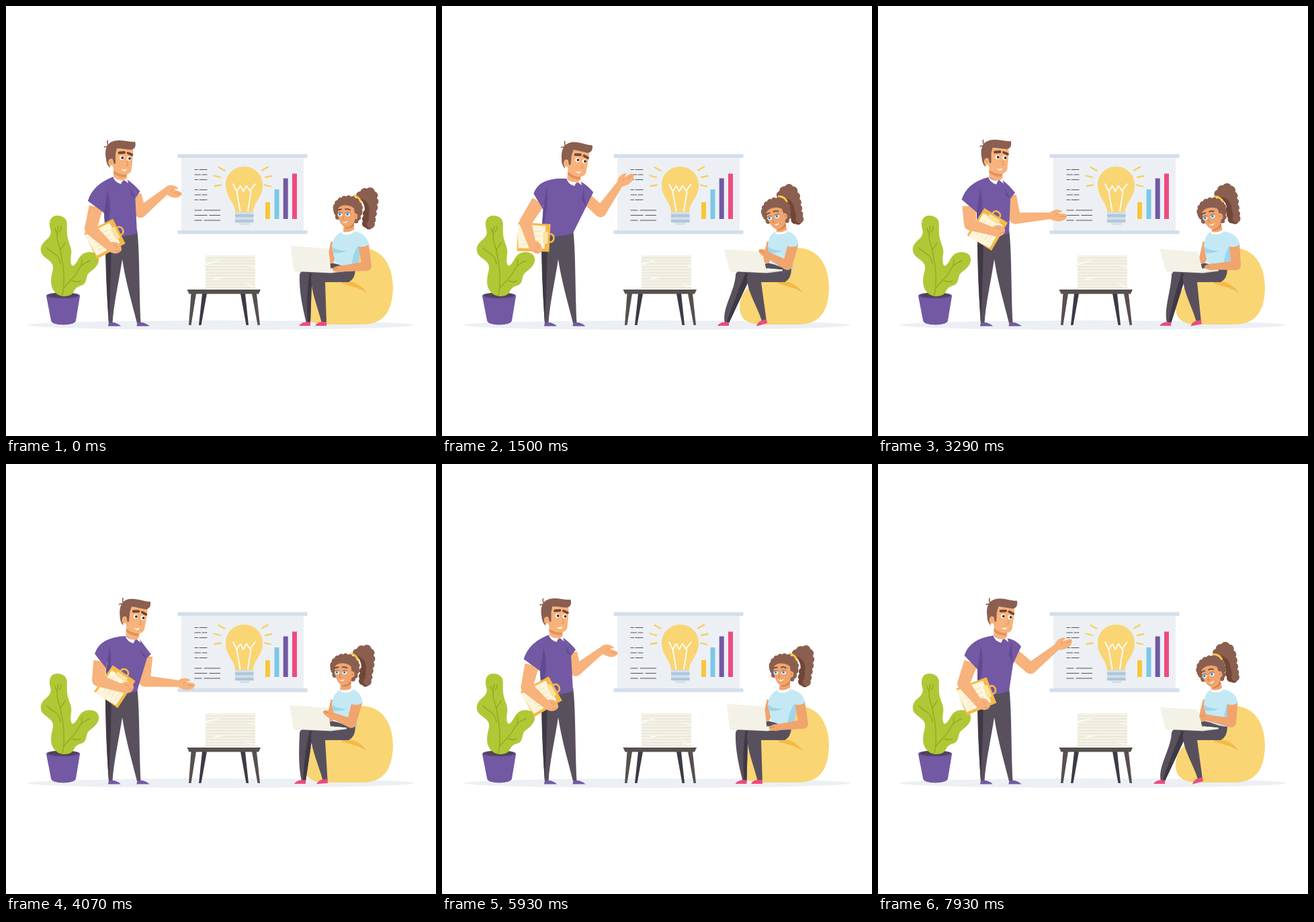
Write an HTML page with a canvas that moves like this. It is 640x640 px and loops after 8000 ms.

```html
<!DOCTYPE html>
<html lang="en">
<head>
<meta charset="utf-8">
<title>Presentation</title>
<style>
html, body { margin: 0; width: 100%; height: 100%; overflow: hidden; background: #fff; }
canvas { display: block; width: 100vw; height: 100vh; }
</style>
</head>
<body>
<canvas id="stage" width="640" height="640"></canvas>
<script>
const ctx = document.getElementById('stage').getContext('2d');
const LOOP = 8000, CYCLE = 6000;
const TIMES = [0, 570, 1500, 1930, 3290, 4070, 5210];
const C = {
  purple: '#7358a3', plum: '#614a92', skin: '#f8b27b', skinLine: '#e3935c', tan: '#f0a46e', tanLine: '#d5824d',
  hair: '#8a5f50', hairDark: '#704639', pants: '#58515d', pantsDark: '#3f3946', pink: '#ee4a80',
  yellow: '#f9d574', amber: '#f6b947', blue: '#c4e9f5', blueDark: '#9fd5ea', rail: '#d3dfea', board: '#ecf0f4',
  paper: '#f4f2e6', green: '#b0c736', vein: '#93ac1c', cream: '#fdf5db'
};

// Smooth cyclic curve through one value set per key time.
function track(...keys) {
  const n = keys.length;
  const at = i => keys[(i + n) % n];
  const when = i => TIMES[(i + n) % n] + CYCLE * Math.floor(i / n);
  const slope = (i, c) => (at(i + 1)[c] - at(i - 1)[c]) / (when(i + 1) - when(i - 1));
  return t => {
    let i = n - 1;
    while (TIMES[i] > t) i--;
    const span = when(i + 1) - when(i), u = (t - when(i)) / span, v = 1 - u;
    return at(i).map((a, c) =>
      a * (1 + 2 * u) * v * v + at(i + 1)[c] * u * u * (3 - 2 * u) +
      span * (slope(i, c) * u * v * v - slope(i + 1, c) * u * u * v));
  };
}

const man = {
  head: track([0, 0, 0], [14, 1, 3], [29, 3, 6], [13.5, .5, 3], [5.5, -1, 0], [20.5, 1, 5], [2, -1, 0]),
  elbowR: track([200, 307], [228, 302], [236, 306], [227, 304], [204, 316], [206, 323], [202, 312]),
  handR: track([240, 274, 5], [258, 256, -20], [266, 263, -45], [268, 271, -35], [259, 312, -10], [259, 327, -5], [250, 291, 3]),
  elbowL: track([126, 332], [124, 324], [124, 322], [127, 327], [137, 325], [137, 322], [130, 329]),
  handL: track([155, 359, 10], [141, 357, 35], [134, 355, 40], [150, 356, 15], [172, 336, -10], [173, 334, -10], [163, 350, -5]),
  board: track([147, 346, -27], [140.5, 345, -7], [136.5, 344, 3], [146.5, 345, -21], [163, 332, -58], [162, 331, -55], [155, 340, -45])
};
const woman = {
  head: track([0, 0, 0], [-5, 1, -6], [-11, 3, -14], [-12.5, 3, -14], [-11.5, 3, -13], [-4.5, 0, 0], [-5, 1, -7]),
  tail: track([0, 0, 0], [-8, -4, -6], [-18, -6, -18], [-18, -6, -17], [-16, -7, -16], [-5, -1, 0], [-8, -5, -8]),
  elbow: track([537, 387], [510, 384], [514, 386], [526, 385], [533, 386], [514, 386], [532, 387]),
  hand: track([500, 391], [483, 363], [484, 370], [492, 378], [500, 388], [485, 374], [497, 384]),
  sway: track([0, 0], [.5, 0], [1, 1], [1, 1], [.65, 1], [.27, .4], [.05, 0])
};

const fill = (d, color) => { ctx.fillStyle = color; ctx.fill(new Path2D(d)); };
const line = (d, color, width = 1) => {
  ctx.strokeStyle = color; ctx.lineWidth = width; ctx.lineCap = ctx.lineJoin = 'round';
  ctx.stroke(new Path2D(d));
};
const rect = (x, y, w, h, color) => { ctx.fillStyle = color; ctx.fillRect(x, y, w, h); };
const oval = (x, y, rx, ry, color) => {
  ctx.fillStyle = color; ctx.beginPath(); ctx.ellipse(x, y, rx, ry, 0, 0, 7); ctx.fill();
};
const dot = (x, y, r, color) => oval(x, y, r, r, color);

function placed(x, y, degrees, draw) {
  ctx.save(); ctx.translate(x, y); ctx.rotate(degrees * Math.PI / 180); draw(); ctx.restore();
}
// Moves and turns a part around its own pivot.
const posed = ([dx, dy, deg], px, py, draw) =>
  placed(px + dx, py + dy, deg, () => { ctx.translate(-px, -py); draw(); });

function taper([ax, ay], [bx, by], ra, rb, color) {
  const a = Math.atan2(by - ay, bx - ax), s = Math.sin(a), c = Math.cos(a);
  fill(`M${ax - s * ra},${ay + c * ra}L${bx - s * rb},${by + c * rb}L${bx + s * rb},${by - c * rb}L${ax + s * ra},${ay - c * ra}Z`, color);
  dot(bx, by, rb, color);
}
function arm(shoulder, elbow, wrist, r, color) {
  taper(shoulder, elbow, r[0], r[1], color);
  taper(elbow, wrist, r[1], r[2], color);
}

function drawBoard() {
  rect(261, 225, 182, 111, C.board);
  rect(255.5, 220.5, 193, 5.5, C.rail);
  rect(255.5, 334, 193, 5.5, C.rail);
  [243.5, 251, 258.5, 273.5, 281, 288.5].forEach((y, i) =>
    line(i % 3 === 1 ? `M281,${y}h8.5M292,${y}h7` : `M281,${y}h4.5M288,${y}h11`, C.pants, 1.2));
  [304, 311.5, 319].forEach((y, i) =>
    line(i === 1 ? `M281,${y}h18M303,${y}h15.5` : `M281,${y}h10M295,${y}h23.5`, C.pants, 1.2));

  line('M316.5,240l9,5M309.5,252.5l9.5,2.5M310.5,268l9-1.5M381,244.5l9-5M386,255l9.5-2M385,266.5l9,2', '#f8cf59', 2.3);
  fill('M341,307C341,292 327,286 327,266C327,251 339,239 354.500,239C370,239 382,251 382,266C382,286 368,292 368,307Z', C.yellow);
  line('M338,265L343.500,276L349,267.500L353,276L358,267.500L363,275L371,265M343.500,276L348.500,305M364.500,276L360,305', '#fff', 1.7);
  fill('M346,321h17.500l-2,5h-13.500Z', C.rail);
  rect(341, 306.5, 27.5, 16, C.rail);
  rect(341, 310, 27.5, 4.3, '#aec7da');
  rect(341, 318, 27.5, 4, '#aec7da');

  rect(386, 292, 7, 25, '#f7c63a');
  rect(399.5, 273, 7, 44, '#7cc7e6');
  rect(412.7, 256.5, 7, 60.5, C.purple);
  rect(426, 249.5, 7, 67.5, C.pink);
}

function drawPlant() {
  fill('M60,432H110L104,468Q103,474 85,474.500Q68,474 67,468Z', C.purple);
  oval(85, 431, 25, 4.7, C.plum);
  oval(85, 430.5, 22.5, 3.6, '#514454');
  fill('M76,312C66,312 63,322 66,332C69,342 62,346 56,352C50,358 50,368 58,374C66,380 73,384 69,396C66,408 65,422 78,430C84,433 94,433 99,428C104,420 103,419 112,416C121,413 118,406 122,399C126,394 139,388 138,376C137,367 126,364 116,368C108,372 108,380 101,386C97,389 95,380 97,370C99,360 92,352 91,340C90,330 92,322 89,318C86,313 80,312 76,312Z', C.green);
  line('M78,328C72,345 80,355 82,370C86,390 88,408 84,431M61,360C69,370 78,366 81,384M88,352C85,360 82,358 81,364M86,420C96,408 101,405 106,396C112,384 118,382 125,379M99,409C105,411 107,411 111,409M112,386C113,382 112,380 113,377M77,338Q73,335 73,331M79,336Q83,332 82,328', C.vein, 1.4);
}

function drawTable() {
  fill('M292,428h7l-8.500,47h-3.500ZM349,428h7l5,47h-3.500Z', C.pantsDark);
  fill('M275.500,428h7.500l-7.500,47h-3.500ZM366,428h7l5,47h-3.500Z', '#57504f');
  fill('M269.500,422H379L376,428.500H272.500Z', '#57504f');
  rect(297, 371, 74, 50, C.paper);
  for (let y = 375; y < 420; y += 4.4) line(`M297.500,${y}H370.500`, '#e2dfcf', .9);
  fill('M291,387Q302,379 321,378L300,385ZM370,387L376,391L356,385ZM306,408Q313,402 328,404ZM356,414L373,416L366,419Z', '#faf9f2');
}

function drawManHead() {
  fill('M160,236V255Q170,265 180,258V244Z', C.skin);
  fill('M160,245Q168,251 180,251L178,255Q166,255 160,249Z', C.skinLine);
  fill('M157,212L189,213C189,225 188,233 187,243C186,250 179,252 171,250C163,247 160,241 157,235Z', C.skin);
  fill('M149,228C146,213 150,204 160,201C172,198 182,203 192,202C194,208 192,214 185,214C178,213 171,212 165,212L163,220V234C160,238 160,230 158,227Q152,230 155,241Q149,235 149,228Z', C.hair);
  oval(156, 232.5, 3.6, 5.3, C.skin);
  line('M155,231q2,0 2,3', C.skinLine);
  line('M154,209Q150,206 151,200.500M154,210Q150,208 146.500,210', C.hair, 1.6);
  line('M168.500,218.500L176,218', C.hairDark, 3.8);
  line('M181.500,218.800L187.500,221.500', C.hairDark, 3.6);
  dot(172.3, 226, 3.2, '#fff');
  dot(183, 227, 3.2, '#fff');
  dot(173.2, 226, 1.9, '#453029');
  dot(184, 227, 1.9, '#453029');
  line('M180,231L181.500,237L178.500,237.500', C.skinLine, 1.1);
  fill('M170.500,242.500Q176,245 179.500,242Q178,249 170.500,242.500Z', '#fff');
}

function drawClipboard([x, y, angle]) {
  placed(x, y, angle, () => {
    line('M24,-6C32,-7 32,7 24,6', C.amber, 2.6);
    fill('M-24,-21L24,-20.500V20.500L-24,22Z', C.amber);
    fill('M-25,-18L17,-17.500V16.500L-22,17.500Z', C.cream);
    fill('M14,-9h7v18h-7Z', '#fae3a0');
    line('M-16,-9H10M-16,-2H10M-16,5H10M-16,11H5', '#efe0b3', 1);
  });
}

function drawMan(t) {
  const head = man.head(t), lean = head[0];
  const elbowR = man.elbowR(t), handR = man.handR(t), elbowL = man.elbowL(t), handL = man.handL(t);
  const nx = 170 + lean * .9, ny = 258 + lean * .1;
  const hemL = [134 + lean * .33, 299 - lean * .27], hemR = [196 + lean * .82, 281 + lean * .25];
  const lx = 12 - lean * .17, ly = 9 + lean * .1;
  const reach = Math.max(0, elbowR[0] - hemR[0]), rx = 3 + reach * .15, ry = 3 + reach * .5;
  const outerL = [hemL[0] - lx, hemL[1] - ly], innerL = [hemL[0] + lx, hemL[1] + ly];
  const outerR = [hemR[0] + rx, hemR[1] - ry], innerR = [hemR[0] - rx, hemR[1] + ry];

  fill('M150,337L195,333C199,360 198,420 200.500,472H195C187,440 178,410 173,377C168,410 160,445 158.500,472H153C150,430 149,390 148,345Z', C.pants);
  fill('M148,345H157C156,400 155,440 153,472C150,430 148,390 148,345Z', C.pantsDark);
  for (const x of [152, 194.5]) fill(`M${x + 1},471h5Q${x + 13},471 ${x + 19},476.500H${x}Z`, C.purple);

  arm([hemR[0] - 3, hemR[1]], elbowR, handR, [8.5, 8.5, 4.8], C.skin);
  placed(...handR, () => {
    fill('M-2,-5C4,-9 10,-8 15,-5Q17,-3 13,-2.500L9,-2L20,1Q24,4 21,6L18,9C10,12 3,9 -3,5Z', C.skin);
    line('M9,-2Q6,-1 5,1M11,3L20,4.500', C.skinLine, .9);
  });

  fill(`M${nx - 10},${ny - 4}Q${outerL[0] + 8},${outerL[1] - 25} ${outerL}L${innerL}L148,341Q172,346 195,338L${innerR}L${outerR}Q${outerR[0] - 8},${outerR[1] - 10} ${nx + 10},${ny}Z`, C.purple);
  fill(`M${innerR}L${outerR[0] - 15},${outerR[1] - 6}L${innerR[0] - 6},${innerR[1] - ry}Z`, C.plum);
  fill(`M${innerL}L148,338Q160,300 ${innerL[0] + 5},${innerL[1] - 34}Z`, C.plum);
  posed(head, 172, 228, drawManHead);
  fill(`M${nx - 11},${ny - 5}Q${nx - 4},${ny + 3} ${nx + 4},${ny + 1}L${nx + 1},${ny + 7}Q${nx - 9},${ny + 4} ${nx - 11},${ny - 5}ZM${nx + 6},${ny + 1}L${nx + 10},${ny - 2}L${nx + 12},${ny + 6}Z`, '#fff');

  drawClipboard(man.board(t));
  arm(hemL, elbowL, handL, [10.5, 9, 6], C.skin);
  placed(...handL, () => {
    fill('M-3,-6C4,-10 10,-10 15,-5Q19,0 16,4Q10,11 -2,6Z', C.skin);
    line('M5,-4Q9,-5 10,-1M9,4L15,3', C.skinLine, .9);
  });
  fill(`M${nx - 12},${ny - 2}Q${outerL[0] + 8},${outerL[1] - 25} ${outerL}L${innerL}L${innerL[0] + 4},${innerL[1] - 32}Z`, C.purple);
}

function drawTail() {
  const bumps = [[527, 282, 6], [534, 278, 7], [542, 277, 7], [547, 282, 6.5], [548, 291, 6.5], [547, 300, 6.5],
    [546, 309, 6], [545, 318, 5.5], [543, 325, 6]];
  [[536, 324, 6], [540, 327, 5.5], [536, 317, 6], [537, 309, 6]].forEach(b => dot(...b, C.hairDark));
  fill('M523,284Q538,276 546,290L546,328L535,328Q532,318 534,304Q534,291 523,284Z', C.hairDark);
  bumps.forEach(b => dot(...b, C.hair));
  fill('M524,281Q548,270 548,300L544,328Q538,318 541,305Q541,289 524,285Z', C.hair);
}

function drawWomanHead() {
  fill('M503,320L518,315L518,335Q510,342 502,336Z', C.tan);
  fill('M505,328Q513,327 518,320V327Q512,332 505,331Z', C.tanLine);
  oval(510, 301, 18.5, 16, C.hair);
  for (let a = 2.6; a < 6.9; a += .36) dot(509 + 18 * Math.cos(a), 301 + 15 * Math.sin(a), 4.3, C.hair);
  [[491, 300, 4.3], [492, 307, 4.2], [494, 314, 4], [526, 308, 4.5], [524, 315, 4.3], [521, 320, 3.6]].forEach(b => dot(...b, C.hair));
  fill('M494,302C498,295 510,295 518,301L520,316C518,326 511,330 505,329.500C497,327 493,314 494,302Z', C.tan);
  oval(520, 313, 3.3, 4.6, C.tan);
  line('M519,313q2-2 2,1', C.tanLine);
  line('M493.500,303.500L499,302.500M505,302.500Q508,301.500 512,303.500', C.hairDark, 1.8);
  for (const x of [497, 508.5]) {
    oval(x, 310, 3.5, 3.1, '#fff');
    dot(x - .3, 310, 2.1, '#55aede');
    dot(x - .3, 310, .9, '#34506b');
    line(`M${x - 3.5},308.500q3.500-3 7,0`, C.hairDark, .9);
  }
  line('M502,313L500.500,317.500L503,318', C.tanLine, 1);
  fill('M500,321Q504,323 509,320Q506,326 500,321Z', '#fff');
  line('M518,282Q526,284 528,292', '#f8c83c', 2.8);
}

function drawWoman(t) {
  const head = woman.head(t), elbow = woman.elbow(t), hand = woman.hand(t);
  const [swing, tilt] = woman.sway(t);
  const back = 450 - 26 * swing, front = 474 + 6 * swing, lift = 471 - 3 * swing;
  const nx = 508 + head[0] * .35, ny = 336, hx = 532 + .4 * (elbow[0] - 537);

  fill('M528,360C562,360 576,388 576,420C575,456 561,474 530,474H475C455,474 443,466 443,448C443,425 463,408 490,400Z', C.yellow);
  fill('M500,410C518,407 530,417 537,427C526,419 515,418 500,413Z', C.amber);

  fill(`M437,400Q438,394 446,395L470,395L455,412L${back + 3},472H${back - 3}C${back - 8},450 436,425 437,400Z`, C.pants);
  fill(`M452,397L462,402L455,412L${back + 3},472H${back - 1}Q${446 - 8 * swing},430 452,397Z`, C.pantsDark);
  fill(`M${back + 3},476H${back - 14}Q${back - 10},470 ${back - 2},470.500H${back + 3}Z`, C.pink);
  fill(`M484,382L520,391Q520,406 510,411L475,411L${front + 3},${lift + 1}H${front - 4}C${front - 10},448 454,425 454,405Q453,397 462,396Z`, C.pants);
  placed(front, lift, -16 * swing, () => fill('M3,5H-14Q-10,-1 -3,-1H3Z', C.pink));

  posed(woman.tail(t), 541, 301, drawTail);
  taper([490, 352], [483, 378], 6.5, 5.5, C.tan);
  fill(`M${nx - 6},${ny}C${nx - 16},${ny + 2} 486,346 485,358L490,382Q505,391 523,391L${hx - 6},359L${hx + 8},355Q${hx + 5},338 ${nx + 9},${ny - 1}Z`, C.blue);
  fill(`M${hx - 8},357L${hx - 4},362L523,391Q518,391 514,390Q515,370 ${hx - 8},357Z`, C.blueDark);
  fill('M486,358Q492,365 508,364Q497,369 487,367Z', C.blueDark);
  posed(head, 508, 305, drawWomanHead);
  fill(`M${nx - 7},${ny}Q${nx + 2},${ny + 2} ${nx + 9},${ny - 3}L${nx + 10},${ny}Q${nx + 2},${ny + 7} ${nx - 8},${ny + 3}Z`, '#fff');

  fill('M430,393L485,390.500L507,392.500V394.500L484,397.500L430,395Z', '#e3e2d5');
  fill('M484,390.500L507,392.500L484,395.500Z', '#f8f8f0');
  fill(`M${425 - 4 * tilt},${357 + 5 * tilt}Q${423 - 4 * tilt},${357 + 5 * tilt} ${424 - 4 * tilt},${359 + 5 * tilt}L428,394L484,397L${480 - 4 * tilt},${361 + 4.5 * tilt}Z`, C.paper);

  arm([hx, 354], elbow, hand, [7.7, 7, 4.5], C.tan);
  const a = Math.atan2(hand[1] - elbow[1], hand[0] - elbow[0]) * 180 / Math.PI;
  placed(...hand, a, () => {
    fill('M-2,-4.500C4,-6 9,-4 13,-2Q16,1 12,3Q6,6 -2,4.500Z', C.tan);
    line('M6,1L12,1', C.tanLine, .8);
  });
  fill(`M${hx - 9},357Q${hx},361 ${hx + 8},355Q${hx + 5},345 ${hx - 3},341L${hx - 8},346Z`, C.blue);
}

function frame() {
  const t = performance.now() % LOOP % CYCLE;
  rect(0, 0, 640, 640, '#fff');
  oval(320, 475, 288, 7, C.board);
  drawBoard();
  drawPlant();
  drawTable();
  drawMan(t);
  drawWoman(t);
  requestAnimationFrame(frame);
}
frame();
</script>
</body>
</html>
```
